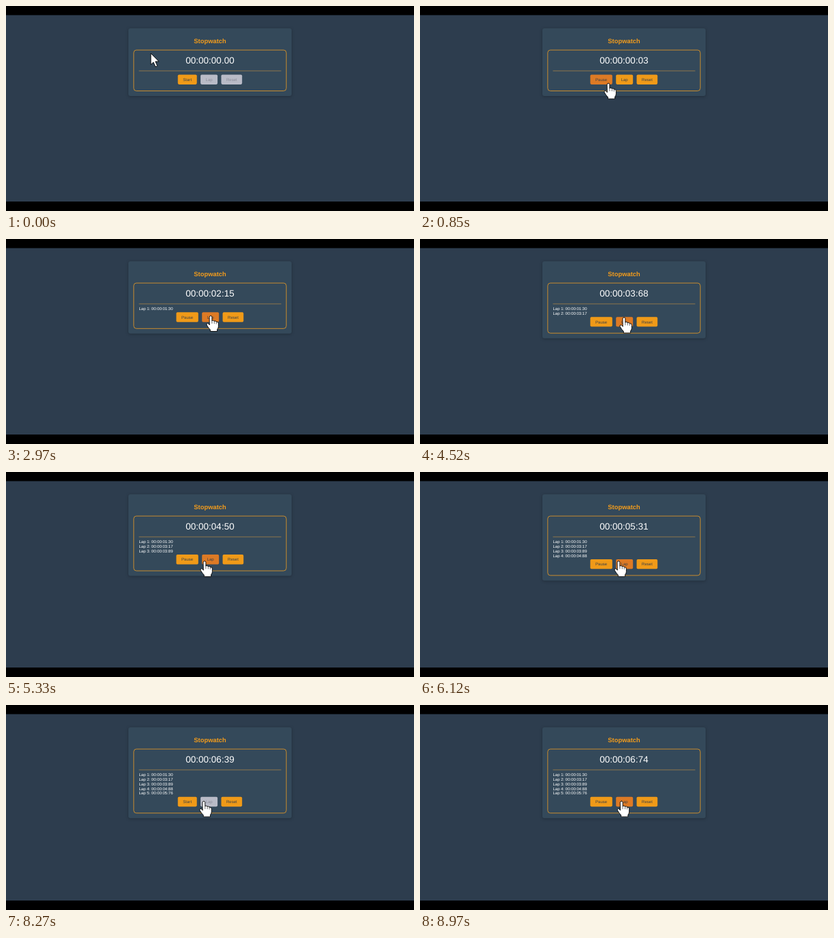
Animation of 600x303 px, one loop 9000 ms. Source, as an HTML page:

```html
<!DOCTYPE html>
<html lang="en">
<head>
<meta charset="utf-8">
<title>Stopwatch</title>
<style>
  html, body { margin: 0; width: 100%; height: 100%; overflow: hidden; background: #000; }
  svg { display: block; width: 100vw; height: 100vh; }
  text { font-family: "Liberation Sans", Arial, sans-serif; text-rendering: geometricPrecision; }
  .title { font-size: 9.4px; font-weight: bold; fill: #f39c1c; }
  .time { font-size: 13.5px; fill: #fff; }
  .lap { font-size: 6px; fill: #fff; }
  .btn text { font-size: 6.05px; }
  .mid { text-anchor: middle; }
  .card { fill: #34495a; filter: drop-shadow(0 1.5px 2px rgba(0, 0, 0, .25)); }
</style>
</head>
<body>
<svg viewBox="0 0 600 303">
  <rect width="600" height="303"/>
  <rect y="13.5" width="600" height="275.5" fill="#2d3d4e"/>
  <rect class="card" id="card" x="180" y="33" width="240" rx="3"/>
  <text class="title mid" x="300" y="54.9">Stopwatch</text>
  <rect id="frame" x="187.8" y="65.1" width="224.4" rx="4" fill="none" stroke="#d9942a" stroke-width=".9"/>
  <text class="time mid" id="time" x="300" y="85"></text>
  <path d="M195.5 95.9H404.7" stroke="#a58048" stroke-width=".8"/>
  <g id="laps"></g>
  <g id="buttons"></g>
  <path id="arrow" d="M0 0V16.6L3.8 13L6.8 19.8L9.6 18.6L6.7 12H11.8Z" fill="#fff" stroke="#000" stroke-width=".9" stroke-linejoin="round"/>
  <g id="hand" stroke="#000" stroke-width=".9" stroke-linejoin="round" stroke-linecap="round">
    <path fill="#fff" d="M-1.9 1.8Q-1.7 .2 0 .2T1.9 1.8V7.4Q3.8 6.2 5.3 8Q7.2 7.2 8.3 9Q11.3 8.6 11.4 11.6V16Q11.2 18.6 9.6 20.3V23.2H-.6V20.8Q-3.2 18.4 -5.8 13.8Q-6.6 11.8 -4.8 11.2Q-3.2 11.3 -1.9 13.4Z"/>
    <path fill="none" stroke-width=".6" d="M1.9 7.4V11.4M5.3 8V11.6M8.3 9V12"/>
  </g>
</svg>
<script>
const NS = "http://www.w3.org/2000/svg";
const LOOP = 9000, ROW = 6.85, START = 820, PAUSE = 7200, RESUME = 8610;
const lapTimes = [130, 317, 389, 488, 576];

// [ms, centiseconds]
const clock = [[START, 0], [1580, 75], [2970, 215], [4520, 368], [6120, 531],
  [PAUSE, 639], [RESUME, 639], [8970, 674], [LOOP, 677]];

// [ms, pointer x, pointer y]
const pointer = [[30, 213, 70], [420, 272, 121], [520, 279, 120], [640, 277, 114],
  [1250, 277, 114], [1580, 283.2, 115.5], [1700, 285, 115.5], [2000, 300, 113],
  [2300, 300, 113], [2600, 301, 113], [3200, 301, 113.5], [3800, 300, 115.7],
  [4760, 300, 115.7], [5320, 292, 131.5], [6640, 292, 131.5], [7080, 277, 143],
  [7260, 277, 143], [7420, 279.7, 143], [7640, 279.7, 143], [8050, 314, 142],
  [8100, 314, 142], [8420, 272, 142], [8680, 272, 142], [8970, 296.3, 142]];

const $ = id => document.getElementById(id);
const lerp = (a, b, k) => a + (b - a) * k;
const smooth = k => k * k * (3 - 2 * k);

function sample(keys, t, ease = k => k) {
  if (t <= keys[0][0]) return keys[0].slice(1);
  const i = keys.findIndex(key => key[0] > t);
  if (i < 0) return keys[keys.length - 1].slice(1);
  const a = keys[i - 1], b = keys[i];
  const k = ease((t - a[0]) / (b[0] - a[0]));
  return a.slice(1).map((v, j) => lerp(v, b[j + 1], k));
}

function add(parent, tag, attrs, text = "") {
  const el = document.createElementNS(NS, tag);
  for (const name in attrs) el.setAttribute(name, attrs[name]);
  el.textContent = text;
  return parent.appendChild(el);
}

function format(cs, dot = ":") {
  const two = n => String(n).padStart(2, "0");
  return `00:00:${two(Math.floor(cs / 100))}${dot}${two(cs % 100)}`;
}

const laps = lapTimes.map((cs, i) =>
  add($("laps"), "text", { class: "lap", x: 195.5, y: 105 + i * ROW }, `Lap ${i + 1}: ${format(cs)}`));

const buttons = ["Start", "Lap", "Reset"].map(label => {
  const g = add($("buttons"), "g", { class: "btn" });
  return {
    box: add(g, "rect", { height: 14.4, rx: 1.8 }),
    text: add(g, "text", { class: "mid" }, label)
  };
});

function place(button, x, w, y, on, px, py) {
  const over = px >= x && px <= x + w && py >= y && py <= y + 14.4;
  const { box, text } = button;
  box.setAttribute("x", x);
  box.setAttribute("y", y);
  box.setAttribute("width", w);
  box.setAttribute("fill", !on ? "#b9bbc7" : over ? "#dd7a25" : "#f09a18");
  text.setAttribute("x", x + w / 2);
  text.setAttribute("y", y + 9.3);
  text.setAttribute("fill", on ? "#3b4148" : "#8b8d99");
  return over;
}

function draw(t) {
  const begun = t >= START;
  const running = begun && (t < PAUSE || t >= RESUME);
  const cs = Math.floor(sample(clock, t)[0] + 1e-6);
  const [px, py] = sample(pointer, t, smooth);
  const count = lapTimes.filter(v => cs >= v).length;
  const grow = count * ROW;

  $("time").textContent = format(cs, begun ? ":" : ".");
  $("card").setAttribute("height", 100 + grow);
  $("frame").setAttribute("height", 60.4 + grow);
  laps.forEach((el, i) => el.setAttribute("visibility", i < count ? "visible" : "hidden"));

  buttons[0].text.textContent = running ? "Pause" : "Start";
  const widths = [running ? 32.4 : 28, 25, 30.7];
  const enabled = [true, running, begun];
  let x = running ? 250.4 : 252.7, over = false;
  buttons.forEach((b, i) => {
    over = place(b, x, widths[i], 101.5 + grow, enabled[i], px, py) || over;
    x += widths[i] + 5.4;
  });

  for (const [id, shown] of [["hand", over], ["arrow", !over]]) {
    $(id).setAttribute("transform", `translate(${px} ${py})`);
    $(id).setAttribute("visibility", shown ? "visible" : "hidden");
  }
}

const origin = performance.now();
function tick() {
  draw((performance.now() - origin) % LOOP);
  requestAnimationFrame(tick);
}
tick();
</script>
</body>
</html>
```
